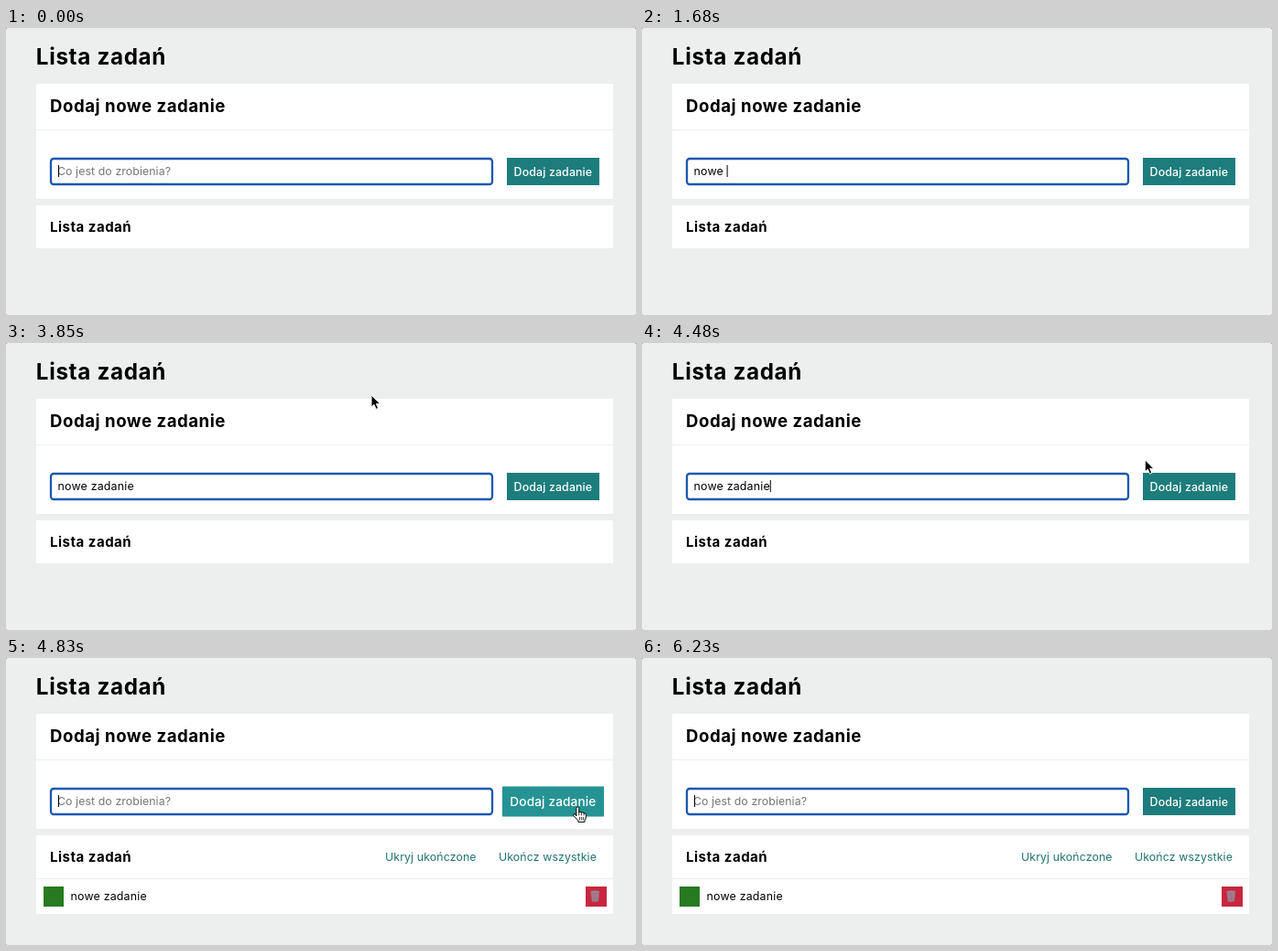
These frames come from a looping animation (688x314 px, 6.37 s). An HTML page:

```html
<!DOCTYPE html>
<html lang="pl">
<head>
<meta charset="utf-8">
<title>Lista zadań</title>
<style>
  html, body { margin: 0; width: 100%; height: 100%; overflow: hidden; background: #6a6c6c; }
  svg { display: block; width: 688px; height: 314px; }
  text { font: 400 12.4px Inter, sans-serif; letter-spacing: .015em; white-space: pre; }
  .bold { font-weight: 700; }
  .h1 { font-size: 24.2px; letter-spacing: .028em; }
  .h2 { font-size: 18.6px; letter-spacing: .029em; }
  .h3 { font-size: 15px; letter-spacing: .034em; }
  .hint { font-size: 12.3px; fill: #757575; letter-spacing: .008em; }
  .link { font-size: 12.3px; fill: #1f7272; letter-spacing: .01em; }
  .label { font-weight: 500; fill: #fff; letter-spacing: .01em; }
</style>
</head>
<body>
<svg viewBox="0 0 688 314">
  <rect width="688" height="314" rx="1.5" fill="#edefee"/>
  <text class="bold h1" x="32.8" y="40">Lista zadań</text>

  <rect x="33" y="61" width="630" height="126" fill="#fff"/>
  <text class="bold h2" x="48" y="92">Dodaj nowe zadanie</text>
  <rect x="33" y="111" width="630" height="1" fill="#edefee"/>
  <rect x="49" y="143" width="482" height="28" rx="3" fill="#fff" stroke="#1c57b0" stroke-width="2.3"/>
  <text id="hint" class="hint" x="56" y="161">Co jest do zrobienia?</text>
  <text id="typed" x="56.6" y="161"></text>
  <rect id="caret" y="150" width="1" height="13"/>
  <g id="button">
    <rect id="face" x="547" y="142" width="101" height="30"/>
    <text class="label" x="554.6" y="161.5">Dodaj zadanie</text>
  </g>

  <rect id="panel" x="33" y="194" width="630" height="47" fill="#fff"/>
  <text class="bold h3" x="48" y="223">Lista zadań</text>
  <g id="item">
    <text class="link" x="414" y="222">Ukryj ukończone</text>
    <text class="link" x="538" y="222">Ukończ wszystkie</text>
    <rect x="33" y="241" width="630" height="1" fill="#edefee"/>
    <rect x="41" y="250" width="22" height="22" fill="#277a20"/>
    <text x="70.6" y="265">nowe zadanie</text>
    <rect x="633" y="250" width="23" height="22" fill="#c8273f"/>
    <g fill="#ab828f" stroke="#93687a" stroke-width=".7">
      <path d="M638.8 256H647.8L646.8 266Q643.3 267.6 639.8 266Z"/>
      <ellipse cx="643.3" cy="256" rx="4.9" ry="1.5"/>
      <path d="M641.3 258.5L641.7 265.5M643.3 258.5V266M645.3 258.5L644.9 265.5" fill="none"/>
    </g>
  </g>

  <path id="arrow" d="M0 0V13.2L3 10.4L5.2 15.4L7.6 14.4L5.4 9.6H9.6Z" stroke="#fff" stroke-width="1" stroke-linejoin="round"/>
  <g id="hand" fill="#fff" stroke="#000" stroke-linejoin="round" stroke-linecap="round">
    <path d="M4.4 10.5V2.3a1.4 1.4 0 0 1 2.8 0V7Q8.6 5.7 9.9 7Q11.5 6.2 12.6 7.7Q14.9 7.2 14.9 9.6V12Q14.9 14 13.5 15.5V17.4H6.4V15.8L1.3 10.6Q.5 8.6 2.5 8.6Z"/>
    <path d="M7.2 7V10M9.9 7V10M12.6 7.7V10M8.1 12.3V15M10.2 12.3V15M12.2 12.3V15" stroke-width=".8"/>
  </g>
</svg>
<script>
const LOOP = 6370, STEP = 70;
const TASK = "nowe\u00a0zadanie";
const KEYS = [910, 1120, 1330, 1470, 1610, 1890, 2100, 2310, 2450, 2730, 3010, 3150];
const SUBMIT = 4830, BLINK = 525, HOVER = 4660, LEAVE = 6050, FADE = 170;
const ENTER = 3780, MOVE = 3990, ARRIVE = 4760, HIDE = 6090;

const $ = id => document.getElementById(id);
const [hint, typed, caret, button, face, panel, item, arrow, hand] =
  ["hint", "typed", "caret", "button", "face", "panel", "item", "arrow", "hand"].map($);

const clamp = v => Math.min(1, Math.max(0, v));
const ramp = (t, start, end) => clamp((t - start) / (end - start));
const easeOut = u => 1 - (1 - u) ** 2;
const mix = (a, b, u) => a + (b - a) * u;
const show = (el, on) => el.setAttribute("visibility", on ? "visible" : "hidden");
const place = (el, x, y) => el.setAttribute("transform", `translate(${x} ${y})`);

function drawInput(t) {
  const done = t >= SUBMIT;
  const pressed = KEYS.filter(k => k <= t);
  const text = done ? "" : TASK.slice(0, pressed.length);
  if (typed.textContent !== text) typed.textContent = text;
  show(hint, !text);

  // The caret restarts its blink after every action
  const last = done ? SUBMIT : pressed.length ? pressed[pressed.length - 1] : -35;
  show(caret, Math.floor((t - last) / BLINK) % 2 === 0);
  caret.setAttribute("x", text ? 56.5 + typed.getComputedTextLength() : 57);
}

function drawButton(t) {
  const u = easeOut(ramp(t, HOVER, HOVER + FADE)) - easeOut(ramp(t, LEAVE, LEAVE + FADE));
  button.setAttribute("transform", `translate(597.5 157) scale(${1 + 0.1 * u}) translate(-597.5 -157)`);
  face.setAttribute("fill", `rgb(${mix(29, 37, u)}, ${mix(124, 147, u)}, ${mix(124, 147, u)})`);
}

function drawPointer(t) {
  const visible = t >= ENTER && t < HIDE;
  const overButton = t >= HOVER;
  const u = ramp(t, MOVE, ARRIVE);
  const p = (u + u * u * (3 - 2 * u)) / 2;
  const x = mix(399, 624, p);
  const y = mix(t < ENTER + STEP ? 47 : 57, 163, p);
  show(arrow, visible && !overButton);
  show(hand, visible && overButton);
  place(arrow, x, y);
  place(hand, x - 5.5, y - 1);
}

function draw(t) {
  drawInput(t);
  drawButton(t);
  drawPointer(t);
  show(item, t >= SUBMIT);
  panel.setAttribute("height", t >= SUBMIT ? 86 : 47);
}

const start = performance.now();
function tick() {
  const t = (performance.now() - start) % LOOP;
  draw(Math.floor(t / STEP) * STEP);
  requestAnimationFrame(tick);
}
tick();
</script>
</body>
</html>
```
